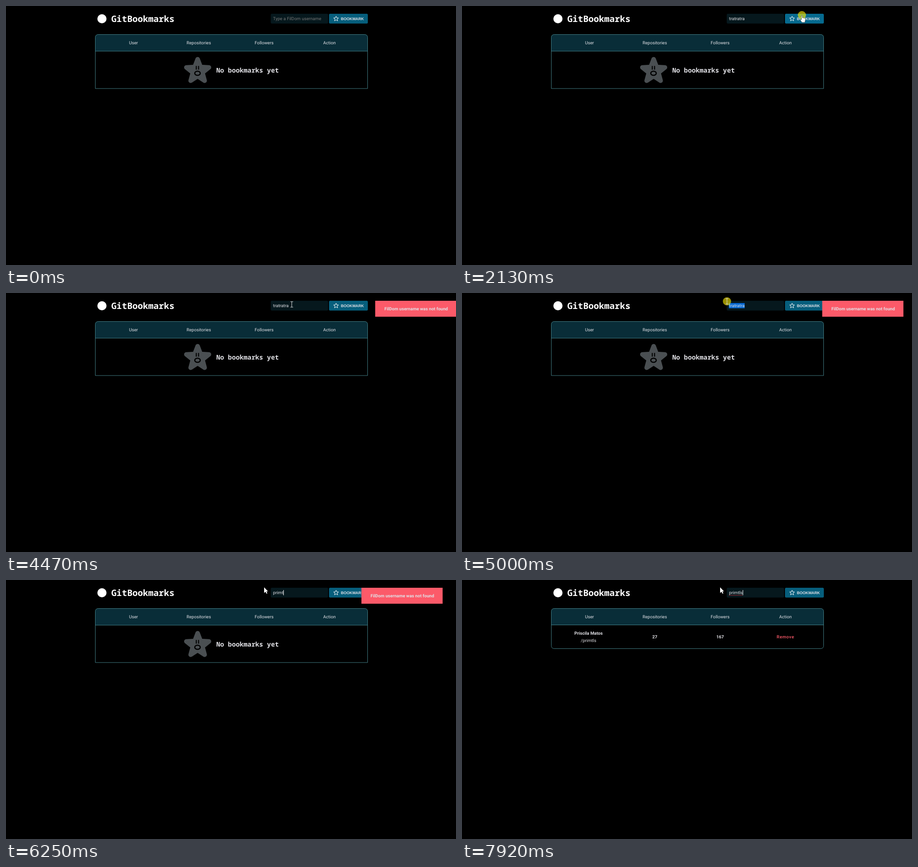
An HTML page that plays this animation: 985x568 px, repeating every 7.99 s.

```html
<!DOCTYPE html>
<html lang="en">
<head>
<meta charset="utf-8">
<title>GitBookmarks</title>
<style>
  html, body { margin: 0; height: 100%; overflow: hidden; background: #000; }
  svg { display: block; width: 100vw; height: 100vh; }
  text { font: 9.6px Roboto, sans-serif; fill: #e1e1e6; text-rendering: geometricPrecision; white-space: pre; }
  .bold { font-weight: 700; }
  .mid { text-anchor: middle; }
  .mono { font-family: "Noto Sans Mono", monospace; }
  .frame { fill: none; stroke: #4d929b; stroke-opacity: .85; }
</style>
</head>
<body>
<svg viewBox="0 0 985 568">
  <circle cx="210" cy="28" r="10" fill="#fff"/>
  <text class="mono" x="230.6" y="35" style="font-size:19.2px;font-weight:600;fill:#fff">GitBookmarks</text>

  <rect x="579.5" y="17" width="125.5" height="21.5" rx="2.5" fill="#06181d"/>
  <rect id="selection" y="22" height="11.5" fill="#0067d2"/>
  <text id="hint" x="584.5" y="31.2" style="fill:#757575">Type a FilDom username</text>
  <text id="typed" x="584.5" y="31.2"></text>
  <path id="squiggle" stroke="#e5303c" stroke-dasharray="2 1"/>
  <rect id="caret" y="22" width="1" height="11.5" fill="#fff"/>

  <rect id="button" x="707" y="17" width="85" height="21.5" rx="2.5"/>
  <path id="icon" fill="none" stroke="#fff" stroke-linejoin="round"/>
  <text class="bold" x="733" y="30.8" style="font:700 8.4px 'Liberation Sans',sans-serif">BOOKMARK</text>

  <path d="M195.5 99V68.500a6 6 0 0 1 6-6H785.500a6 6 0 0 1 6 6V99z" fill="#092d38"/>
  <g class="bold mid">
    <text x="279" y="83.8">User</text>
    <text x="422" y="83.8">Repositories</text>
    <text x="565" y="83.8">Followers</text>
    <text x="708" y="83.8">Action</text>
  </g>

  <g id="empty">
    <path class="frame" d="M195.5 181V68.500a6 6 0 0 1 6-6H785.500a6 6 0 0 1 6 6V181zM195.500 99H791.500"/>
    <path id="star" fill="#4a4f52" stroke="#4a4f52" stroke-width="10" stroke-linejoin="round"/>
    <path d="M416.500 131.500v8M421.500 131.500v8" stroke="#000" stroke-width="2.200"/>
    <ellipse cx="419.200" cy="147.500" rx="6" ry="4.500" fill="none" stroke="#000" stroke-width="2.600"/>
    <text class="mono bold" x="460.200" y="146.200" style="font-size:14.250px">No bookmarks yet</text>
  </g>

  <g id="row">
    <rect class="frame" x="195.500" y="62.500" width="596" height="88" rx="6"/>
    <path class="frame" d="M195.500 98.500H791.500"/>
    <g class="mid">
      <text class="bold" x="277" y="120.200">Priscila Matos</text>
      <text x="277" y="135.700">/primtls</text>
      <text class="bold" x="422" y="128.400">27</text>
      <text class="bold" x="565" y="128.400">167</text>
      <text x="708" y="128.200" style="fill:#fb5a69;font-weight:500;letter-spacing:.6px">Remove</text>
    </g>
  </g>

  <g id="toast">
    <rect y="17" width="177.700" height="35" fill="#fc5a69"/>
    <text class="bold" x="20" y="37.800">FilDom username was not found</text>
  </g>

  <circle id="press" r="9" fill="#ffee00" fill-opacity=".6"/>
  <g id="cursor">
    <path id="arrow" d="M0 0V12.500L3 9.800L5.200 14L7.200 13L5 9H8.500z" fill="#fff"/>
    <path id="beam" d="M-3-6H3M-3 6H3M0-6V6" stroke="#ddd" fill="none"/>
    <path id="hand" d="M-1 1Q0-1 1 1V5.500L6.500 7Q8 7.500 7.700 10L6.500 16H0L-3.500 10.500Q-3.500 8.500-1 10z" fill="#fff" stroke="#222" stroke-width=".6"/>
  </g>
</svg>
<script>
const LOOP = 7990;
const $ = id => document.getElementById(id);
const set = (id, attrs) => { for (const k in attrs) $(id).setAttribute(k, attrs[k]); };
const show = (id, on) => set(id, { visibility: on ? 'visible' : 'hidden' });
const clamp = v => Math.min(1, Math.max(0, v));
const easeOut = p => 1 - (1 - clamp(p)) ** 3;
const within = (t, a, b) => t >= a && t < b;

function starPath(cx, cy, outer, inner) {
  const points = Array.from({ length: 10 }, (_, i) => {
    const r = i % 2 ? inner : outer, a = (i / 5 - .5) * Math.PI;
    return (cx + r * Math.cos(a)).toFixed(2) + ' ' + (cy + r * Math.sin(a)).toFixed(2);
  });
  return 'M' + points.join('L') + 'z';
}
set('star', { d: starPath(419.5, 142.7, 26, 11) });
set('icon', { d: starPath(722.5, 28, 5.8, 2.5) });

// Pointer stops: time, x, y
const stops = [
  [70, 967, 560], [300, 830, 240], [500, 727, 62], [650, 657, 67], [810, 640, 34],
  [880, 640, 29], [1710, 640, 29], [1780, 675, 33], [1920, 744, 20],
  [2240, 744, 20], [2395, 940, 222],
  [4050, 985, 315], [4250, 770, 150], [4390, 632, 62], [4470, 625.5, 25],
  [4700, 625.5, 25], [5100, 565, 16]
];

function pointerAt(t) {
  const i = stops.findIndex(s => s[0] > t);
  if (i < 0) return stops.at(-1).slice(1);
  if (!i) return stops[0].slice(1);
  const [t0, x0, y0] = stops[i - 1], [t1, x1, y1] = stops[i];
  const p = (t - t0) / (t1 - t0);
  return [x0 + (x1 - x0) * p, y0 + (y1 - y0) * p];
}

const typing = (word, t, start, step) =>
  word.slice(0, Math.max(0, Math.floor((t - start) / step) + 1));

function draw(t) {
  const [x, y] = pointerAt(t);
  const inBar = y >= 17 && y <= 38.5;
  const overInput = inBar && x >= 579 && x <= 705;
  const overButton = inBar && x >= 707 && x <= 792;
  const pointerOn = within(t, 70, 2395) || t >= 4050;
  set('cursor', { transform: `translate(${x} ${y})` });
  show('beam', pointerOn && overInput);
  show('hand', pointerOn && overButton);
  show('arrow', pointerOn && !overInput && !overButton);
  set('press', { cx: x, cy: y });
  show('press', within(t, 880, 960) || within(t, 2125, 2240) || within(t, 4680, 5250));
  set('button', { fill: pointerOn && overButton ? '#066a8f' : '#065e7c' });

  const word = t < 5750 ? typing('tratratra', t, 950, 110) : typing('primtls', t, 5750, 120);
  $('typed').textContent = word;
  show('hint', !word);
  const end = 584.5 + (word ? $('typed').getComputedTextLength() : 0);
  const left = Math.max(584, x);
  set('selection', { x: left, width: Math.max(0, end - left) });
  show('selection', within(t, 4700, 5750));
  set('caret', { x: end });
  show('caret', within(t, 880, 2125) || t >= 5750);
  set('squiggle', { d: `M584.500 33.500H${end}` });
  show('squiggle', within(t, 5270, 5750) || t >= 7100);

  const slide = 985 - 207 * easeOut((t - 2860) / 3400) + 215 * easeOut((t - 6402) / 2304);
  set('toast', { transform: `translate(${slide} 0)` });
  show('toast', within(t, 2860, 7920));

  const saved = t >= 7400;
  show('empty', !saved);
  show('row', saved);
}

const begin = performance.now();
function tick() {
  draw((performance.now() - begin) % LOOP);
  requestAnimationFrame(tick);
}
tick();
</script>
</body>
</html>
```
